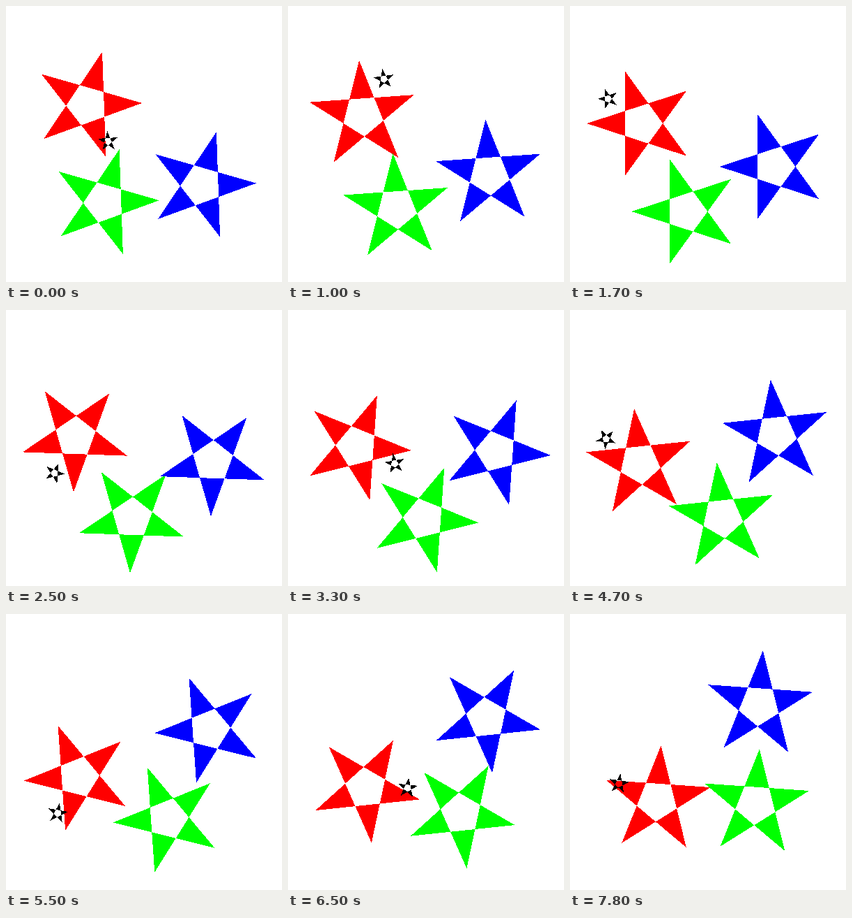
Animation, 396 px wide and 395 px high, one loop 7900 ms. Source, as an HTML page:

```html
<!DOCTYPE html>
<html lang="en">
<head>
<meta charset="utf-8">
<title>Orbiting stars</title>
<style>
  @property --n {
    syntax: "<number>";
    inherits: true;
    initial-value: 0;
  }
  html, body {
    margin: 0;
    width: 100%;
    height: 100%;
    overflow: hidden;
    background: #fff;
  }
  svg {
    display: block;
    width: 396px;
    height: 395px;
    shape-rendering: crispEdges;
    animation: tick 7.9s steps(79) infinite;
  }
  @keyframes tick {
    from { --n: 0; }
    to { --n: 79; }
  }
  #star { fill-rule: evenodd; }

  /* Each body circles the centre by 1deg per tick and turns by 2deg. */
  .body {
    transform:
      rotate(calc(var(--at) - var(--n) * 1deg))
      translateX(100px)
      rotate(calc(70deg - var(--at) - var(--n) * 1deg));
  }
  /* The moon circles the red star by 12deg per tick and turns by 22deg. */
  .moon {
    transform:
      rotate(calc(215deg - var(--n) * 1deg))
      translateX(100px)
      rotate(calc(-155deg - var(--n) * 11deg))
      translateX(60px)
      rotate(calc(-10deg - var(--n) * 10deg))
      scale(.19);
  }
  .red { --at: 215deg; fill: #f00; }
  .green { --at: 125deg; fill: #0f0; }
  .blue { --at: 35deg; fill: #00f; }
</style>
</head>
<body>
<svg viewBox="-198.2 -199 396 395">
  <defs>
    <polygon id="star" points="79,0 -63.91,46.44 24.41,-75.13 24.41,75.13 -63.91,-46.44"/>
  </defs>
  <use href="#star" class="body red"/>
  <use href="#star" class="body green"/>
  <use href="#star" class="body blue"/>
  <use href="#star" class="moon"/>
</svg>
</body>
</html>
```
